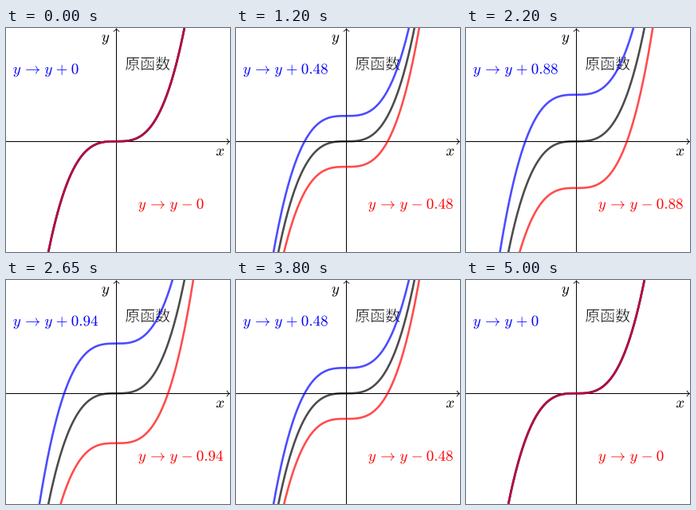
A matplotlib script for the animation above (5.05 s loop, 281 px wide and 281 px high).

```python
import numpy as np
import matplotlib.pyplot as plt
from matplotlib.animation import FuncAnimation
from matplotlib.patches import PathPatch
from matplotlib.path import Path
from matplotlib.textpath import TextPath
from matplotlib.transforms import Affine2D

SIZE, DPI = 281, 64          # stage in pixels
AXIS_X, AXIS_Y = 138.5, 142.5
OX, OY, UNIT = 138.15, 142.2, 66.5
EM = 19.05
FRAMES, STEP = 101, 50

plt.rcParams["mathtext.fontset"] = "cm"
plt.rcParams["path.snap"] = False

fig = plt.figure(figsize=(SIZE / DPI, SIZE / DPI), dpi=DPI, facecolor="white")
ax = fig.add_axes([0, 0, 1, 1])
ax.set(xlim=(0, SIZE), ylim=(SIZE, 0))
ax.axis("off")


def px(width):
    return width * 72 / DPI


def text_path(s, x, y, size=EM, prop=None):
    glyphs = TextPath((0, 0), s, size=size, prop=prop)
    return glyphs.transformed(Affine2D().scale(1, -1).translate(x, y))


def add_text(s, x, y, color="black", lw=0, edge="none", **kw):
    patch = PathPatch(text_path(s, x, y, **kw), fc=color, ec=edge,
                      lw=px(lw), zorder=1)
    return ax.add_patch(patch)


def add_axis(start, tip, angle):
    ax.plot(*zip(start, tip), color="black", lw=px(1), zorder=2,
            solid_capstyle="butt")
    u = 0.9
    verts = np.array([(-3.75, -4), (-3.5, -2.5), (-0.75, -0.25), (0, 0),
                      (-0.75, 0.25), (-3.5, 2.5), (-3.75, 4)]) * u
    codes = [Path.MOVETO] + [Path.CURVE4] * 6
    place = Affine2D().rotate_deg(angle).translate(*tip)
    ax.add_patch(PathPatch(Path(verts, codes).transformed(place), fc="none",
                           ec="black", lw=px(0.8), capstyle="round",
                           joinstyle="round", zorder=2))


def formula(sign, value):
    # TeX-like spacing around the arrow and the sign
    return (r"$y\hspace{0.157}\rightarrow\hspace{0.116}y\hspace{0.094}"
            + sign + r"\hspace{0.053}" + f"{value:g}$")


add_text("原函数", 149.2, 51.7, size=19, lw=0.5, edge="white",
         prop={"family": "Noto Sans CJK JP"})
add_axis((0, AXIS_Y), (280.5, AXIS_Y), 0)
add_axis((AXIS_X, SIZE), (AXIS_X, 0.8), -90)
add_text("$x$", 263.3, 160)
add_text("$y$", 119.9, 17)

xs = np.linspace(-1.7, 1.7, 400)


def add_curve(color, z):
    return ax.plot(OX + UNIT * xs, OY - UNIT * xs ** 3, color=color,
                   lw=px(2.6), alpha=0.7, zorder=z)[0]


add_curve("black", 3)
parts = [("+", 1, add_curve("blue", 4), add_text("$y$", 0, 0, "blue"), (8.8, 57.4)),
         ("-", -1, add_curve("red", 5), add_text("$y$", 0, 0, "red"), (165.8, 226.7))]


def update(i):
    shift = min(i, FRAMES - 1 - i) / 50
    for sign, way, curve, label, spot in parts:
        curve.set_ydata(OY - UNIT * (xs ** 3 + way * shift))
        label.set_path(text_path(formula(sign, shift), *spot))
    return [p for part in parts for p in part[2:4]]


anim = FuncAnimation(fig, update, frames=FRAMES, interval=STEP,
                     init_func=lambda: update(0), repeat=True, repeat_delay=0)
plt.show()
```
